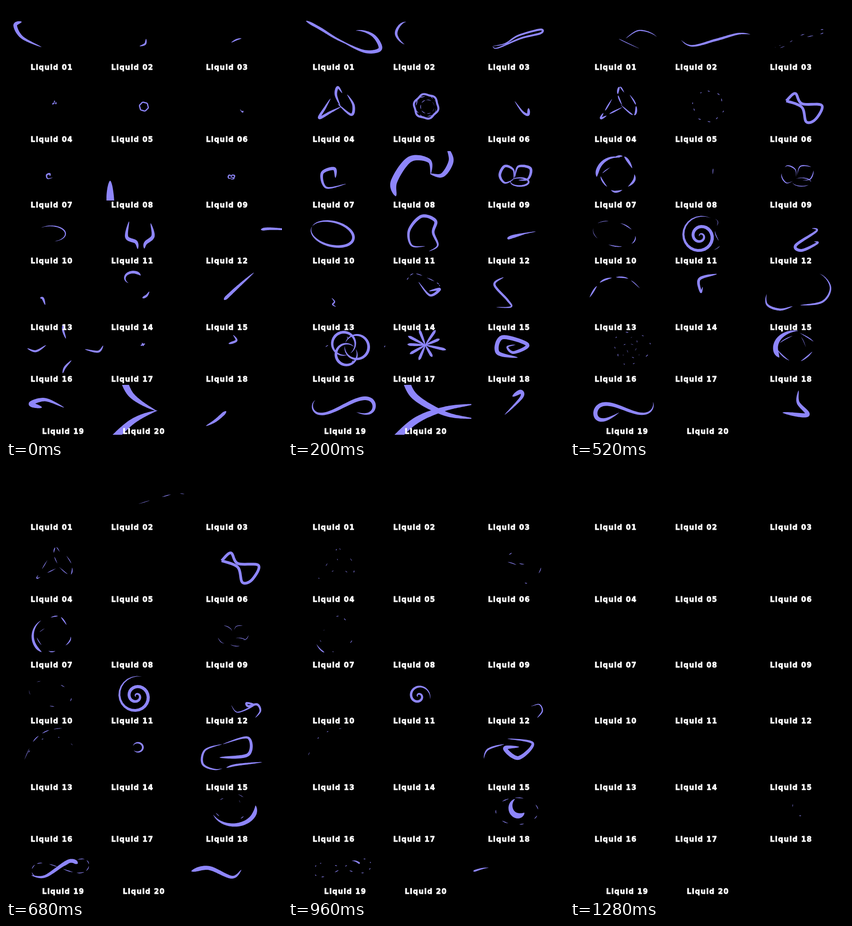
Write an HTML page that moves like this. It is 599x935 px and loops after 1.36 s.

```html
<!DOCTYPE html>
<html lang="en">
<head>
<meta charset="utf-8">
<title>Liquid shapes</title>
<style>
html, body { margin: 0; width: 100%; height: 100%; overflow: hidden; background: #000; }
svg { display: block; width: 100vw; height: 100vh; }
text { font: bold 15.2px "DejaVu Sans", Verdana, sans-serif; letter-spacing: 1.4px; fill: #fff; stroke: #fff; stroke-width: .9px; }
path { fill: #8e86fb; }
</style>
</head>
<body>
<svg viewBox="0 0 599 935" xmlns="http://www.w3.org/2000/svg">
<clipPath id="c8"><rect x="215" y="314" width="150" height="107"/></clipPath>
<clipPath id="c20"><rect x="220" y="820" width="178" height="108"/></clipPath>
<g id="ink"></g>
<g id="labels"></g>
</svg>
<script>
const STEP = 40, LOOP = 1360, LAST = 32;
const mix = (a, b, u) => a + (b - a) * u;
const clamp = v => Math.max(0, Math.min(1, v));
const noise = n => { const v = Math.sin(n * 127.1 + 3.7) * 43758.5; return v - Math.floor(v); };
const rad = deg => deg * Math.PI / 180;

// Paths: functions of u in 0..1 that give a point.
function curve(text) {
  const p = text.split(" ").map(s => s.split(",").map(Number)), m = p.length - 1;
  return u => {
    const i = Math.min(m - 1, Math.floor(clamp(u) * m)), f = clamp(u) * m - i;
    const a = p[Math.max(0, i - 1)], b = p[i], c = p[i + 1], d = p[Math.min(m, i + 2)];
    return [0, 1].map(n => b[n] + .5 * f * (c[n] - a[n] + f * (2 * a[n] - 5 * b[n] + 4 * c[n] - d[n]
      + f * (3 * (b[n] - c[n]) + d[n] - a[n]))));
  };
}
const arc = (cx, cy, rx, ry, from, to, tilt = 0) => u => {
  const a = rad(mix(from, to, u)), t = rad(tilt), x = rx * Math.cos(a), y = ry * Math.sin(a);
  return [cx + x * Math.cos(t) - y * Math.sin(t), cy + x * Math.sin(t) + y * Math.cos(t)];
};
const ring = (cx, cy, r, wave = 0, from = 0) => u => {
  const a = rad(from + u * 360), q = r * (1 + wave * Math.sin(6 * a));
  return [cx + q * Math.cos(a), cy + q * Math.sin(a)];
};
const spiral = (cx, cy, r, from, turns) => u => {
  const a = rad(from - u * turns * 360), q = r * (1 - u) ** 1.45 + 1.5 * u;
  return [cx + q * Math.cos(a), cy + q * Math.sin(a)];
};
const eight = (cx, cy, rx, ry, from, to, tilt = 0) => u => {
  const a = rad(mix(from, to, u)), x = rx * Math.cos(a);
  return [cx + x, cy + ry * Math.sin(2 * a) - tilt * x];
};

// grow, trail and dry are [start, end] in steps: the head runs out, the tail
// follows, the line breaks into shrinking pieces. bloom [x, y, scale] grows
// the whole shape out of a point instead.
const ink = (path, w, grow, opts) => ({ path, w, grow, peak: .5, thin: .7, pieces: 1, ...opts });
// Drawn, whole at step t, then swallowed by its own tail.
const pass = (path, w, t, peak = .5, stay = 4) => ink(path, w, [t - 4, t], { trail: [t, t + stay], peak });

const progress = (span, k) => span ? clamp((k - span[0]) / (span[1] - span[0])) : 0;
function swell(u, peak) {
  if (!peak) return 1;
  const v = u < peak ? u / peak : (1 - u) / (1 - peak);
  return Math.sin(Math.PI / 2 * clamp(v)) ** .75;
}

function outline({ path, w, grow, trail, dry, bloom, peak, thin, pieces }, k) {
  const out = 1 - (1 - progress(grow, k)) ** 2;
  const a = progress(trail, k) ** (trail && trail[2] || 1), gap = progress(dry, k);
  const b = bloom ? 1 : out, scale = bloom ? mix(bloom[2], 1, out) : 1;
  if (k < grow[0] || b <= a || gap >= 1) return "";
  const place = u => {
    const p = path(clamp(u));
    return bloom ? p.map((v, n) => mix(bloom[n], v, scale)) : p;
  };
  const size = Math.max(1.4, w * Math.sqrt(scale) * (1 - a) ** thin * (1 - gap) ** 2.2);
  const count = gap > 0 ? pieces : 1, steps = count > 1 ? 14 : 60, sharp = Math.min(1, gap * 5);
  let d = "";
  for (let n = 0; n < count; n++) {
    const keep = clamp(1 - gap + (noise(n + pieces) - .5) * gap * (1 - gap));
    const mid = (n + .5 + (noise(n * 3 + 1) - .5) * (1 - keep) * .6) / count;
    const left = [], right = [];
    for (let j = 0; j <= steps; j++) {
      const v = j / steps, f = mid + (v - .5) * keep / count, u = mix(a, b, f);
      const [x, y] = place(u), s = place(u - .006), e = place(u + .006);
      const dx = e[0] - s[0], dy = e[1] - s[1], len = Math.hypot(dx, dy) || 1;
      const h = size / 2 * swell(f, peak) * swell(v, .5) ** sharp;
      left.push((x - dy / len * h).toFixed(1) + " " + (y + dx / len * h).toFixed(1));
      right.unshift((x + dy / len * h).toFixed(1) + " " + (y - dx / len * h).toFixed(1));
    }
    d += "M" + left.concat(right).join("L") + "Z";
  }
  return d;
}

const petal = (shape, w, bloom, dry, pieces) => ink(curve(shape), w, [0, 6], { bloom, dry, pieces });
const ray = (_, i) => {
  const a = rad(i * 40 + 12 + noise(i) * 22), far = 62 + noise(i + 20) * 22;
  const x = 298 + far * Math.cos(a), y = 734 + far * .8 * Math.sin(a);
  return ink(curve(`298,734 ${x},${y}`), 6, [1, 13], { trail: [5, 10], peak: .85 });
};

const effects = [
  [pass(curve("34,34 20,42 35,68 77,89"), 8, 0, .3),
   ink(curve("39,32 70,49 106,71 150,92"), 6, [0, 3], { trail: [5, 17], peak: .2, thin: 2 }),
   ink(curve("112,74 165,98 200,93 185,64 150,53 121,70"), 8, [1, 8], { trail: [9, 16], thin: 1.4 })],

  [pass(curve("304,71 302,82 290,87"), 4, 0, .5, 2),
   ink(curve("288,36 250,36 235,62 262,86 318,73 366,60 396,62"), 6, [1, 16],
     { trail: [1, 31], dry: [13, 20], pieces: 3, thin: .3 })],

  [pass(curve("489,79 500,73 511,70"), 3, 0, .5, 2),
   ink(curve("444,87 472,81 500,64 547,51 548,59 505,70 455,91 444,87"), 4.5, [1, 4], { dry: [7, 15], pieces: 8 })],

  ["118,188 108,175 104,192 114,217", "92,200 80,220 67,243 92,230 116,218", "129,191 143,215 138,236 108,212"]
    .map(s => petal(s, 6, [105, 209, .1], [11, 27], 3)),

  [ink(ring(300, 217, 33, .05), 5, [0, 11], { bloom: [299, 218, .28], dry: [7, 15], pieces: 10, peak: 0 }),
   ink(ring(300, 217, 31, -.05), 3.5, [1, 11], { bloom: [300, 218, .28], dry: [4, 9], pieces: 8 }),
   ink(ring(303, 218, 17), 2.5, [2, 8], { bloom: [300, 218, .5], dry: [3, 12], pieces: 7 })],

  [ink(curve("492,206 509,229 521,235 522,221"), 6, [0, 4], { bloom: [512, 228, .2], trail: [5, 8], peak: .8 }),
   ink(curve("468,205 488,188 503,211 548,215 534,246 513,252 503,219 468,205"), 6, [6, 16],
     { bloom: [507, 218, .6], dry: [17, 27], pieces: 5, peak: 0 })],

  [ink(curve("103,372 100,352 74,362 83,393 126,385"), 7, [0, 5], { bloom: [93, 367, .25], trail: [5, 8], peak: .25 }),
   ink(curve("90,347 67,370 98,402 140,375 120,328 92,329"), 10, [5, 9], { dry: [9, 27], pieces: 6, peak: .8 }),
   ink(arc(100, 368, 42, 41, -55, -240), 8, [9, 18], { trail: [11, 27], peak: .8 })],

  [pass(curve("228,455 226,410 226,378"), 17, 0, .3),
   ink(curve("234,412 230,380 264,332 306,335 310,364"), 14, [1, 5], { trail: [5, 14], peak: .25, thin: 4 }),
   ink(curve("308,363 335,366 354,335 345,305"), 11, [2, 5], { dry: [5, 11], pieces: 3, peak: .6 })],

  [petal("490,375 489,354 470,346 459,366 470,383 489,376", 6, [488, 371, .2], [10, 21], 2),
   petal("492,372 500,347 527,351 522,374 500,377", 6, [488, 371, .2], [10, 21], 2),
   ink(arc(503, 381, 20, 9, 200, 560), 4, [0, 6], { bloom: [488, 371, .2], dry: [10, 21], pieces: 2 })],

  [pass(arc(97, 493, 32, 17, -130, 75), 2.5, 0, .5, 3),
   ink(arc(96, 493, 47, 26, 190, 550, 14), 6, [1, 5], { dry: [9, 20], pieces: 5 })],

  [pass(curve("267,466 262,500 282,511 286,526"), 8, 0),
   pass(curve("314,470 319,498 303,513 300,525"), 8, 0),
   ink(curve("298,520 268,518 263,485 290,455 320,465 315,490 325,518 306,531"), 7, [1, 5],
     { trail: [9, 17], dry: [9, 20], pieces: 3 }),
   ink(spiral(283, 498, 45, -60, 2.5), 7, [9.5, 14], { trail: [15, 31, 2], peak: .35 })],

  [pass(curve("630,485 575,482 553,484"), 6, 0, .75),
   pass(curve("538,488 490,497 480,503 520,491"), 4.5, 5),
   pass(curve("482,523 535,488 530,482 476,510 497,524"), 5, 9),
   pass(curve("525,481 535,487 490,518 503,529 537,513 530,510"), 6.5, 13),
   pass(curve("489,518 503,533 537,518 522,513 526,520 545,516 552,530 541,545"), 5, 17, .7, 12)],

  [pass(curve("74,632 80,633 85,647"), 5, 0),
   pass(curve("95,632 101,640 97,646 104,651"), 3, 5),
   pass(arc(115, 625, 29, 27, 205, 350), 6, 9, .85),
   ink(curve("153,612 120,588 70,595 41,633"), 6, [9, 13], { dry: [12, 18], pieces: 4, peak: .8 }),
   ink(curve("125,567 90,573 60,595 38,640"), 4, [13, 16], { dry: [13, 27], pieces: 4 })],

  [pass(arc(276, 589, 18, 13, 125, 335), 6, 0, .8),
   pass(curve("296,632 305,627 311,618"), 5, 0, .3, 2),
   ink(curve("257,594 275,579 320,597 330,607"), 2, [1, 3], { dry: [2, 12], pieces: 6, peak: 0 }),
   pass(curve("283,597 308,626 329,613 306,617"), 6, 5, .65),
   pass(curve("275,610 284,596 308,626"), 4, 9),
   pass(arc(304, 600, 29, 23, 165, 410), 6, 9, .8),
   pass(curve("319,580 281,591 284,619 288,608"), 6, 13, .3),
   pass(arc(286, 609, 11, 10, 200, 500), 4, 17)],

  [pass(curve("473,636 505,606 538,577"), 7, 0, .12),
   pass(curve("468,587 448,603 476,636 484,651 452,652"), 5, 5, .3),
   pass(curve("440,595 433,604 449,628"), 3.5, 9),
   ink(curve("466,584 535,577 565,607 548,640 497,648"), 5.5, [7, 14], { trail: [11, 18], peak: .7 }),
   ink(curve("483,650 455,657 427,645 432,615 469,602"), 5, [10, 17], { trail: [15, 30], thin: .3 }),
   pass(curve("556,641 500,647 478,653"), 4.5, 17),
   pass(curve("470,602 525,588 525,625 463,631"), 7, 17, .75),
   pass(curve("476,590 531,600 500,632 471,611 502,608"), 9, 24, .7)],

  [...["46,741 65,747 87,734", "124,688 124,702 130,720", "171,743 200,748 211,735", "123,795 128,782 142,767"]
     .map(s => pass(curve(s), 4.5, 0, .5, 6)),
   ...[[121, 731, 25], [149, 738, 26], [127, 754, 23]].map(([x, y, r], i) =>
     ink(ring(x, y, r, 0, i * 130 + 70), 6, [1, 6], { dry: [6, 15], pieces: 6 }))],

  [pass(curve("292,735 302,731"), 3.5, 0, .5, 2), pass(curve("295,729 299,736"), 3, 0, .5, 2),
   ...Array.from({ length: 9 }, ray)],

  [pass(curve("483,731 500,724 493,712"), 5, 0, .25, 2),
   pass(curve("499,761 455,750 465,717 520,733 490,750 476,738 494,733"), 9, 5, .2),
   ink(curve("515,747 495,712 449,738 490,772 533,735 495,705"), 9, [5, 9], { dry: [9, 19], pieces: 5, peak: .8 }),
   ink(arc(494, 740, 48, 37, -60, -375), 11, [11, 18], { trail: [12, 23], peak: .8, thin: .3 }),
   ink(arc(497, 747, 46, 29, 0, 360), 2, [17, 18], { dry: [15, 29], pieces: 7, peak: 0 }),
   ink(arc(500, 738, 17, 19, -115, -320), 12, [20, 24], { dry: [26, 33], pieces: 2, peak: .7 })],

  [pass(curve("78,869 54,861 85,852 126,869"), 10, 0, .25),
   pass(eight(120, 866, 67, 17, 65, -205), 8, 5, .35),
   pass(eight(118, 867, 65, 15, 190, -115), 7, 9, .25),
   pass(eight(118, 872, 63, 17, 260, -10, .15), 9, 13, .25),
   pass(curve("55,886 85,888 135,856 156,860"), 8.5, 17, .85, 10),
   ink(eight(118, 870, 62, 15, 0, 360, .1), 1.6, [13, 14], { dry: [12, 27], pieces: 12, peak: 0 })],

  ["250,790 273,843 340,882 402,893", "215,955 275,899 340,872 402,862"]
    .map(s => ink(curve(s), 15, [-3, 5], { dry: [6, 12], pieces: 5, peak: .1 })),

  [pass(curve("434,909 455,897 478,877"), 7, 0, .8),
   pass(curve("470,885 506,848 505,835 487,845"), 9, 5, .75),
   pass(curve("500,855 503,833 489,853 512,891"), 7.5, 9, .8),
   pass(curve("496,832 495,858 515,885 461,880"), 9, 13, .75),
   pass(curve("511,874 490,890 440,870 402,877"), 9, 17, .8, 10)]
];

const make = (parent, tag, attrs = {}) => {
  const el = document.createElementNS("http://www.w3.org/2000/svg", tag);
  for (const name in attrs) el.setAttribute(name, attrs[name]);
  return document.getElementById(parent).appendChild(el);
};
const clips = { 7: "url(#c8)", 19: "url(#c20)" };
const paths = effects.map((_, i) => make("ink", "path", clips[i] && { "clip-path": clips[i] }));
const rows = [138.3, 294.3, 435.8, 557.3, 700.5, 812.8, 925.5];
for (let i = 0; i < 20; i++) {
  const row = Math.floor(i / 3), x = [53.6, 228.5, 434][i % 3] + (row === 6 ? 25 : 0);
  make("labels", "text", { x, y: rows[row] }).textContent = "Liquid " + String(i + 1).padStart(2, "0");
}

let shown = -1;
function draw() {
  const k = Math.min(LAST, Math.floor(performance.now() % LOOP / STEP));
  if (k !== shown) {
    effects.forEach((strokes, i) => paths[i].setAttribute("d", strokes.map(s => outline(s, k)).join("")));
    shown = k;
  }
  requestAnimationFrame(draw);
}
draw();
</script>
</body>
</html>
```
